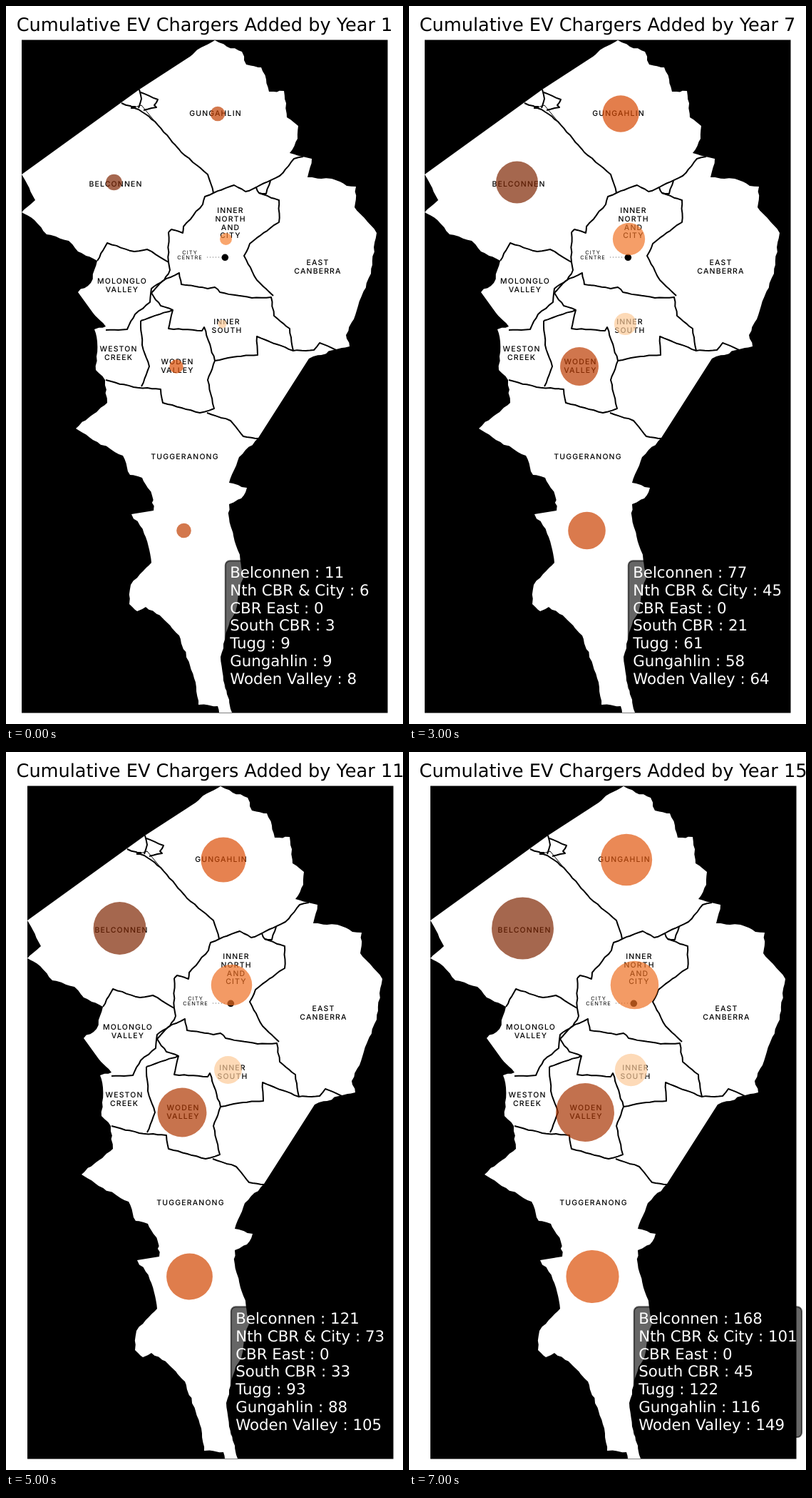
These frames come from a looping animation (557 by 1006 pixels, 7.5 s). An HTML page:

```html
<!DOCTYPE html>
<html lang="en">
<head>
<meta charset="utf-8">
<title>Cumulative EV Chargers</title>
<style>
html, body { margin: 0; width: 100%; height: 100%; overflow: hidden; background: #fff; }
svg { display: block; width: 557px; height: 1006px; text-rendering: geometricPrecision; }
.plot { font-family: "DejaVu Sans", sans-serif; white-space: pre; }
.place { font: 500 10.5px Inter, sans-serif; letter-spacing: 1.15px; text-anchor: middle; }
.small { font-size: 7.4px; font-weight: 400; letter-spacing: 1px; }
.line { fill: none; stroke: #000; stroke-width: 2; stroke-linejoin: round; }
.thin { stroke-width: 1; }
</style>
</head>
<body>
<svg id="stage" viewBox="0 0 557 1006">
  <text id="title" class="plot" y="35" font-size="25.6" text-anchor="middle"></text>
  <g id="chart">
    <rect x="22" y="47.5" width="513.5" height="943"/>
    <g id="map"></g>
    <g id="bubbles" fill-opacity=".7"></g>
    <rect id="box" x="307.8" y="777.4" height="182.6" rx="6.4" fill-opacity=".6"
          stroke="#000" stroke-opacity=".6" stroke-width="2.1"/>
    <g id="legend" class="plot" font-size="21.33" fill="#fff"></g>
  </g>
</svg>
<script>
const STEP = 500, YEARS = 15, PAD = 6.4;
const $ = id => document.getElementById(id);
const map = $("map");

function add(parent, tag, attrs, text = "") {
  const el = document.createElementNS("http://www.w3.org/2000/svg", tag);
  for (const k in attrs) el.setAttribute(k, attrs[k]);
  el.textContent = text;
  parent.append(el);
  return el;
}

let seed = 7;
const random = () => (seed = seed * 16807 % 2147483647) / 2147483647;

// Splits each leg into short steps and shakes the new points
function rough(points, shake) {
  const knots = points.split(" ").map(p => p.split(",").map(Number));
  const out = [knots[0]];
  for (let i = 1; i < knots.length; i++) {
    const [x, y] = knots[i - 1], [dx, dy] = [knots[i][0] - x, knots[i][1] - y];
    const n = Math.ceil(Math.hypot(dx, dy) / 7);
    for (let k = 1; k < n; k++)
      out.push([dx, dy].map((d, j) => [x, y][j] + d * k / n + (random() - .5) * 2 * shake));
    out.push(knots[i]);
  }
  return out.join(" ");
}

// Territory outline, clockwise from the western tip
const coast = [
  "258,71 274,58 293,48 310,57 331,64 337,82 358,86 365,103 369,120 390,119 394,156 410,168 409,186 398,206 416,211",
  "429,214 423,240 457,242 478,252 491,253 489,282 520,318 512,375 494,420 477,461 482,477 459,482 425,494",
  "354,605 327,632 313,668 338,675 330,690 313,698 313,718 325,762 333,795 323,845 308,880 301,912 305,945 317,990",
  "299,990 297,981 270,979 264,942 243,882 220,858 196,842 184,848 173,838 175,811 188,796 204,780 196,744 188,728 176,712",
  "207,707 205,686 191,661 174,657 164,630 122,608 98,592 142,556 139,524 126,510 128,470 124,453 140,449 122,430",
  "101,401 119,388 128,357 101,344 88,329 57,320 40,300 22,289 41,272 30,250 22,236"
];
add(map, "polygon", { points: coast.map(c => rough(c, 1.3)).join(" ") + " 187,117", fill: "#fff" });

const borders = [
  "162,136 186,145 209,162 246,205 283,236 291,262",
  "187,117 190,130 186,143",
  "189,121 213,131 208,139 211,142 193,146",
  "351,254 384,238 404,214 417,211",
  "355,262 365,263 371,245",
  "228,317 232,313 248,318 249,309 276,278 279,267 291,262 320,251 336,260 351,254 355,262 383,272 383,303 371,311 342,333 334,350 352,384 375,406",
  "128,357 142,332 180,344 198,341 228,359 228,317",
  "228,359 230,370 222,384 204,396 202,415 181,432 170,453 140,454",
  "204,402 220,385 243,374 246,390 283,396 293,394 300,401 345,409 372,408 376,434 398,452 403,483 432,482 440,472 463,482",
  "403,483 380,474 352,463 353,489 325,491 293,497",
  "204,402 217,420 234,426",
  "189,441 234,426 228,452 275,455 278,450 293,497 283,524 292,564 272,570 220,556 217,537 179,534 140,524",
  "189,441 191,475 201,505 190,533",
  "282,570 315,581 333,603 354,606"
];
for (const b of borders) add(map, "polyline", { points: rough(b, .7), class: "line" });
add(map, "path", { d: "M177 143L190 139L209 162", class: "line thin" });
add(map, "rect", { x: 175, y: 140, width: 7, height: 4 });

// One word per line, centred on x, y
function place(x, y, name, gap = 11.6, style = "") {
  const words = name.split(" ");
  words.forEach((word, i) => add(map, "text", {
    x: x + .5, y: y + (i - (words.length - 1) / 2) * gap + gap / 3, class: "place " + style
  }, word));
}
place(293.5, 150, "GUNGAHLIN");
place(153.5, 249, "BELCONNEN");
place(314.5, 304, "INNER NORTH AND CITY");
place(437, 365, "EAST CANBERRA");
place(162.5, 391, "MOLONGLO VALLEY");
place(309.5, 448, "INNER SOUTH");
place(157.5, 486, "WESTON CREEK");
place(240, 504, "WODEN VALLEY");
place(250.5, 631.5, "TUGGERANONG");
place(257.5, 349, "CITY CENTRE", 7.5, "small");
add(map, "path", { d: "M282 352H301", class: "line thin", "stroke-dasharray": "1 3", "stroke-opacity": .6 });
add(map, "circle", { cx: 307.3, cy: 352.3, r: 4.8 });

// Name, bubble centre, running total by year
const { min, max } = Math;
const regions = [
  ["Belconnen", 151.5, 247, y => 11 * y + max(0, y - 12)],
  ["Nth CBR & City", 308.5, 326.5, y => max(6 * y, 7 * y - 4)],
  ["CBR East", 440, 390, y => 0],
  ["South CBR", 303.5, 445.5, y => 3 * y],
  ["Tugg", 249.5, 735, y => min(9 * y, 8 * y + 5, 7 * y + 17)],
  ["Gungahlin", 297, 151, y => min(9 * y, 8 * y + 2, 7 * y + 11)],
  ["Woden Valley", 239, 505, y => max(9 * y - 1, 10 * y - 6, 11 * y - 16)]
].map(([name, cx, cy, total], i) => ({
  name, total,
  bubble: add($("bubbles"), "circle", { cx, cy }),
  label: add($("legend"), "text", { x: 307.8 + PAD, y: 801 + i * 24.83 })
}));

const ramp = [[255, 245, 235], [253, 208, 162], [253, 141, 60], [217, 72, 1], [127, 39, 4]];

function shade(u) {
  const i = min(3, Math.floor(u * 4)), f = u * 4 - i;
  return `rgb(${ramp[i].map((c, k) => Math.round(c + (ramp[i + 1][k] - c) * f))})`;
}

function draw(year) {
  const shift = year > 9 ? 8 : 0;
  $("chart").setAttribute("transform", `translate(${shift})`);
  $("title").setAttribute("x", 278.5 + shift);
  $("title").textContent = `Cumulative EV Chargers Added by Year ${year}`;
  const totals = regions.map(r => r.total(year)), top = max(...totals);
  let width = 0;
  regions.forEach(({ name, bubble, label }, i) => {
    const n = totals[i];
    bubble.setAttribute("r", n && 3.33 * Math.sqrt(n) + .3);
    bubble.setAttribute("fill", shade(n / top));
    label.textContent = `${name} : ${n}`;
    width = max(width, label.getComputedTextLength());
  });
  $("box").setAttribute("width", width + 2 * PAD);
}

let shown = 0;
const start = performance.now();
function tick() {
  const year = Math.floor((performance.now() - start) / STEP) % YEARS + 1;
  if (year !== shown) draw(shown = year);
  requestAnimationFrame(tick);
}
tick();
</script>
</body>
</html>
```
